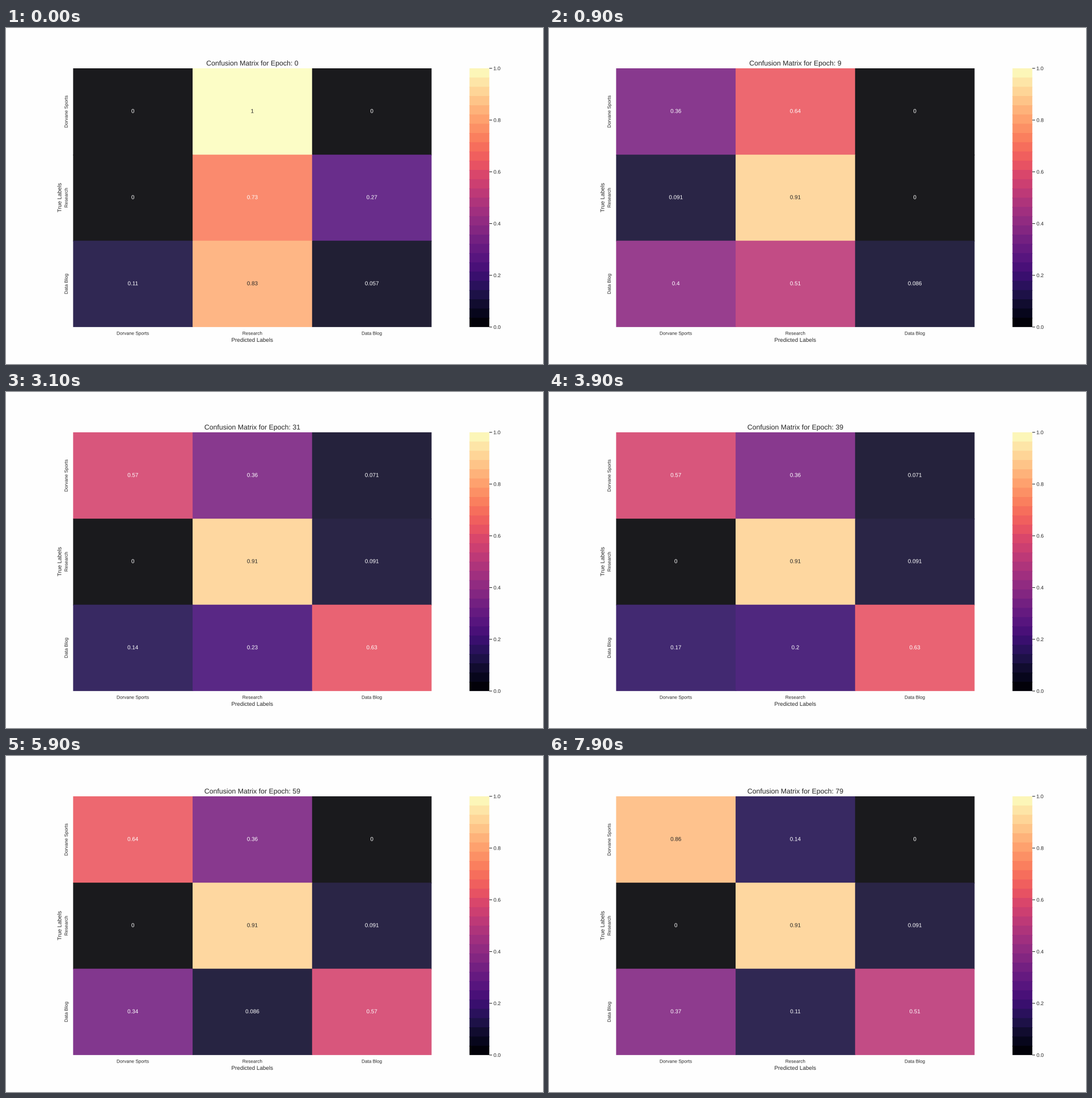
Write a matplotlib script that moves like this. It is 947 px wide and 592 px high and loops after 8 s.

```python
import numpy as np
import matplotlib.pyplot as plt
from matplotlib.animation import FuncAnimation
from matplotlib.patches import PathPatch, Rectangle
from matplotlib.textpath import TextPath
from matplotlib.transforms import Affine2D

W, H, DPI = 947, 592, 64
FRAMES, STEP = 80, 100
INK = "0.15"
LABELS = ["Dorvane Sports", "Research", "Data Blog"]
TOTALS = np.array([14, 11, 35])
BANDS = 28

plt.rcParams["font.family"] = "Liberation Sans"
magma = plt.get_cmap("magma")

# Layout on a 1600 x 1000 canvas at 100 dpi, scaled down to the stage
LEFT, RIGHT, TOP, BOTTOM = 200, 1268, 120, 890
BAR_LEFT, BAR_RIGHT = 1381, 1440
XS = np.round(np.linspace(LEFT, RIGHT, 4))
YS = np.round(np.linspace(TOP, BOTTOM, 4))
MID_X = (XS[:-1] + XS[1:]) / 2
MID_Y = (YS[:-1] + YS[1:]) / 2
CENTER_X, CENTER_Y = (LEFT + RIGHT) / 2, (TOP + BOTTOM) / 2

fig = plt.figure(figsize=(W / DPI, H / DPI), dpi=DPI, facecolor="#fefefe")
ax = fig.add_axes([0, 0, 1, 1], xlim=(0, 1600), ylim=(1000, 0))
ax.axis("off")


def box(x0, y0, x1, y1, color=INK):
    return ax.add_patch(Rectangle((x0, y0), x1 - x0, y1 - y0,
                                  fc=color, lw=0, snap=False))


class Label:
    """Text outline placed on its baseline with sub-pixel accuracy."""

    def __init__(self, x, y, text, size, align=0.5, angle=0):
        self.x, self.y, self.size = x, y, size
        self.align, self.angle = align, angle
        self.patch = ax.add_patch(PathPatch(self.outline(text), fc=INK, lw=0,
                                            snap=False))

    def outline(self, text):
        path = TextPath((0, 0), text, size=self.size * 100 / 72)
        ink = path.get_extents()
        place = (Affine2D().translate(-ink.x0 - self.align * ink.width, 0)
                 .scale(1, -1).rotate_deg(-self.angle)
                 .translate(self.x, self.y))
        return place.transform_path(path)

    def show(self, text, color=INK):
        self.patch.set_path(self.outline(text))
        self.patch.set_facecolor(color)


def ramp(t, start, end):
    """Smooth step from 0 to 1."""
    s = np.clip((t - start) / (end - start), 0, 1)
    return s * s * (3 - 2 * s)


def matrix(t):
    """Row-normalised predictions; the middle class takes the remainder."""
    jump, settle, learn = ramp(t, 0, 4), ramp(t, 4, 17), ramp(t, 17, 31)
    late = ramp(t, 49, 67)
    first = [4 * jump + 4 * settle + 4 * ramp(t, 49, 79),
             jump - settle,
             4 + 10 * jump - 9 * learn + 8 * ramp(t, 31, 67)]
    last = [settle - late,
            3 - 3 * jump + learn,
            2 - jump + 21 * ramp(t, 4, 32) - 4 * late]
    first, last = np.round(first), np.round(last)
    return np.column_stack([first, TOTALS - first - last, last]) / TOTALS[:, None]


# Each cell reaches slightly under the next so that no seam shows
cells = [box(x0, y0, min(x1 + 2, RIGHT), min(y1 + 2, BOTTOM))
         for y0, y1 in zip(YS, YS[1:]) for x0, x1 in zip(XS, XS[1:])]
notes = [Label(x, y + 4.2, "0", 12) for y in MID_Y for x in MID_X]
title = Label(CENTER_X, TOP - 8.3, "0", 15)

for x, y, name in zip(MID_X, MID_Y, LABELS):
    Label(x, 913.2, name, 10)
    Label(183.9, y, name, 10, angle=90)
Label(CENTER_X, 934, "Predicted Labels", 12)
Label(164.8, CENTER_Y, "True Labels", 12, angle=90)

# Stepped colour bar
edges = np.linspace(TOP, BOTTOM, BANDS + 1)
for i, (y0, y1) in enumerate(zip(edges, edges[1:])):
    box(BAR_LEFT, y0, BAR_RIGHT, min(y1 + 2, BOTTOM),
        magma(1 - (i + 0.5) / BANDS))
for v in np.linspace(0, 1, 6):
    y = BOTTOM - v * (BOTTOM - TOP)
    box(BAR_RIGHT, y - 0.9, BAR_RIGHT + 8.3, y + 0.9)
    Label(BAR_RIGHT + 13.2, y + 5.5, f"{v:.1f}", 11, align=0)


def update(epoch):
    for v, cell, note in zip(matrix(epoch).flat, cells, notes):
        cell.set_facecolor(0.9 * np.array(magma(v)[:3]) + 0.1)
        note.show(f"{v:.2g}", INK if v > 0.77 else "white")
    title.show(f"Confusion Matrix for Epoch: {epoch}")
    return []


anim = FuncAnimation(fig, update, frames=FRAMES, interval=STEP,
                     repeat=True, repeat_delay=0)
plt.show()
```
